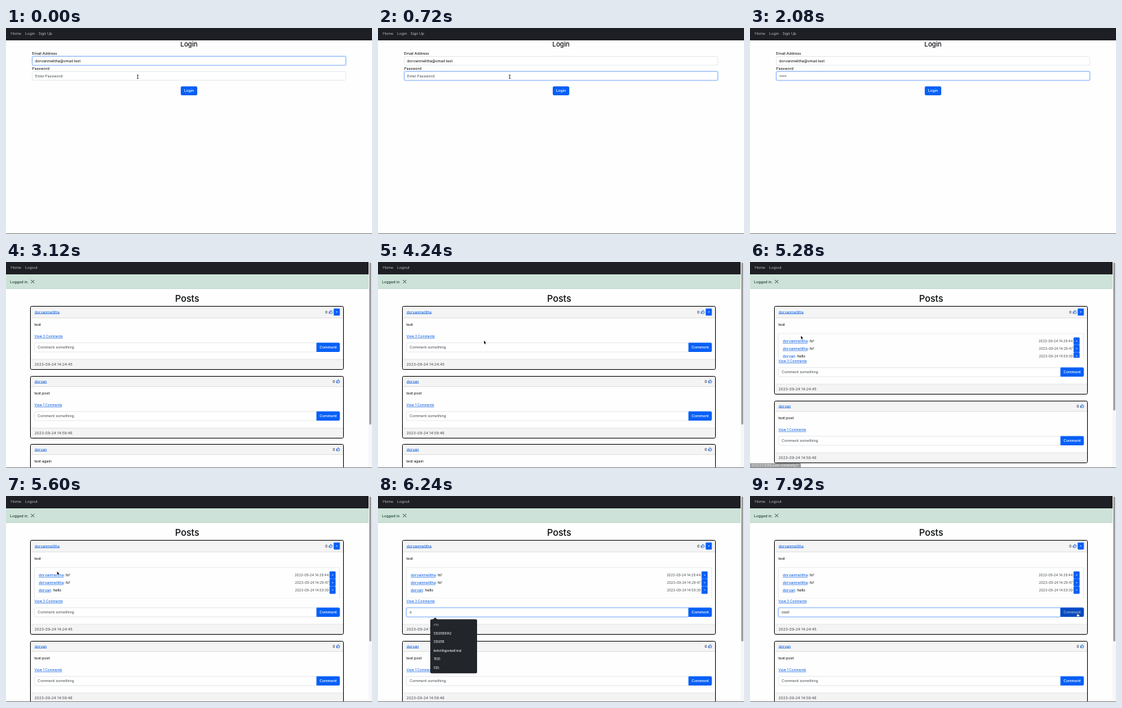
Animation of 532 by 300 pixels, one loop 8000 ms. Source, as an HTML page with a canvas:

```html
<!DOCTYPE html>
<html lang="en">
<head>
<meta charset="utf-8">
<title>Login and comment</title>
<style>
html, body { margin: 0; width: 100%; height: 100%; overflow: hidden; background: #fefefe; }
canvas { display: block; width: 532px; height: 300px; }
</style>
</head>
<body>
<canvas id="stage" width="532" height="300"></canvas>
<script>
const ctx = document.getElementById('stage').getContext('2d');
const LOOP = 8000;
const PAGE = '#fefefe', DARK = '#1e1f24', INK = '#05070a', MUTED = '#434a50', BLUE = '#0760f6', LINK = '#0058e0';
const USER = 'dorvanmelitha', FRIEND = 'dorvan';
const BASE = 5.4, SMALL = 4.8;

const clamp = v => Math.max(0, Math.min(1, v));
const ramp = (t, start, length) => clamp((t - start) / length);
const countPast = (times, t) => times.filter(at => t >= at).length;

// CSS "ease": cubic-bezier(.25, .1, .25, 1)
function ease(x) {
  let lo = 0, hi = 1;
  for (let i = 0; i < 20; i++) {
    const u = (lo + hi) / 2;
    if (0.75 * u * (1 - u) + u ** 3 < x) lo = u; else hi = u;
  }
  return 0.3 * lo * (1 - lo) ** 2 + 3 * lo * lo * (1 - lo) + lo ** 3;
}

function rect(x, y, w, h, color) {
  ctx.fillStyle = color;
  ctx.fillRect(x, y, w, h);
}

function rounded(x, y, w, h, r, fill, stroke, line = 1) {
  ctx.beginPath();
  ctx.roundRect(x, y, w, h, r);
  if (fill) { ctx.fillStyle = fill; ctx.fill(); }
  if (stroke) { ctx.strokeStyle = stroke; ctx.lineWidth = line; ctx.stroke(); }
}

// y is the middle of the capitals
function text(str, x, y, { size = BASE, color = INK, align = 'left', weight = 400, underline } = {}) {
  ctx.font = `${weight} ${size}px Inter, "Liberation Sans", sans-serif`;
  ctx.textAlign = align;
  ctx.fillStyle = color;
  const base = y + size * 0.36;
  ctx.fillText(str, x, base);
  const width = ctx.measureText(str).width;
  if (underline) rect(x, base + 0.6, width, 0.6, color);
  return width;
}

const link = (str, x, y, size = BASE) => text(str, x, y, { size, color: LINK, underline: true });

function field(x, y, w, h, focus) {
  rounded(x, y, w, h, 2, '#fff', '#dcdfe3', 0.7);
  if (focus > 0) {
    ctx.globalAlpha = focus;
    rounded(x - 0.5, y - 0.5, w + 1, h + 1, 2.2, null, '#c8ddfe', 1.2);
    rounded(x, y, w, h, 2, null, '#86b7fe', 0.7);
    ctx.globalAlpha = 1;
  }
}

function button(label, x, y, w, h, r) {
  rounded(x, y, w, h, r, BLUE);
  text(label, x + w / 2, y + h / 2, { color: '#fff', align: 'center', weight: 500 });
}

function navbar(width, items) {
  rect(0, 0, width, 18, DARK);
  items.forEach(([label, x]) => text(label, x, 8.2, { color: '#b9bbbe' }));
}

function ibeam(x, y) {
  rect(x - 0.4, y - 2.6, 0.8, 5.2, '#222');
  rect(x - 1.4, y - 3, 2.8, 0.6, '#222');
  rect(x - 1.4, y + 2.4, 2.8, 0.6, '#222');
}

function shape(points, x, y) {
  ctx.beginPath();
  points.forEach(([px, py]) => ctx.lineTo(x + px, y + py));
  ctx.closePath();
  ctx.lineJoin = 'round';
  ctx.strokeStyle = '#fff';
  ctx.lineWidth = 1;
  ctx.stroke();
  ctx.fillStyle = '#111';
  ctx.fill();
}

const arrow = (x, y) => shape([[0, 0], [0, 4.6], [1.1, 3.7], [1.9, 5.4], [2.6, 5.1], [1.9, 3.5], [3.3, 3.4]], x, y);

function hand(x, y) {
  rounded(x - 0.8, y - 0.2, 1.4, 4, 0.7, '#fff', '#111', 0.5);
  rounded(x - 1.7, y + 2, 4.2, 3.2, 1, '#fff', '#111', 0.5);
}

function thumbsUp(x, y) {
  ctx.strokeStyle = LINK;
  ctx.lineWidth = 0.7;
  ctx.beginPath();
  ctx.rect(x - 2.4, y - 0.4, 1.2, 2.6);
  ctx.moveTo(x - 1.2, y - 0.3);
  ctx.lineTo(x, y - 2.5);
  ctx.lineTo(x + 0.7, y - 2);
  ctx.lineTo(x + 0.4, y - 0.6);
  ctx.lineTo(x + 2.4, y - 0.6);
  ctx.lineTo(x + 1.8, y + 2.2);
  ctx.lineTo(x - 1.2, y + 2.2);
  ctx.stroke();
}

function dropButton(x, y, w, h) {
  rounded(x, y, w, h, 1.3, BLUE);
  const cx = x + w / 2, cy = y + h / 2;
  ctx.fillStyle = '#fff';
  ctx.beginPath();
  ctx.moveTo(cx - 1.2, cy - 0.5);
  ctx.lineTo(cx + 1.2, cy - 0.5);
  ctx.lineTo(cx, cy + 0.8);
  ctx.fill();
}

function loginPage(t) {
  const focus = ease(ramp(t, 80, 200));
  navbar(532, [['Home', 7], ['Login', 28], ['Sign Up', 47.3]]);
  text('Login', 266, 24, { size: 9.4, align: 'center', weight: 500 });
  text('Email Address', 38, 37);
  field(38.3, 41.4, 455.6, 12.8, 1 - focus);
  text(USER + '@vmail.test', 42.3, 47.8);
  text('Password', 38, 58.8);
  field(38.3, 63.4, 455.6, 12.8, focus);

  const firstTry = t >= 880 && t < 1280;
  const dots = firstTry ? 1 : countPast([1600, 1760, 1920, 2080, 2320, 2560, 2720], t);
  if (!dots) text('Enter Password', 42.3, 69.8, { color: MUTED });
  for (let i = 0; i < dots; i++) {
    ctx.fillStyle = INK;
    ctx.beginPath();
    ctx.arc(44 + i * 2.6, 69.9, 0.75, 0, 7);
    ctx.fill();
  }
  if (t >= 240 && t < 720) rect(42, 66.5, 0.6, 6.5, INK);

  button('Login', 254, 85, 24, 13, 2);
  if (t < 880) ibeam(191.5, 71);
}

function commentList(top, height) {
  if (height <= 0) return;
  ctx.save();
  ctx.beginPath();
  ctx.rect(40, top, 447, height);
  ctx.clip();
  rounded(41.3, top + 0.5, 443.7, 44.5, 1, null, '#d9dce0', 0.7);
  const rows = [[USER, 'hi!', '14:29:44'], [USER, 'hi!', '14:29:47'], [FRIEND, 'hello', '14:59:39']];
  rows.forEach(([name, message, time], i) => {
    const y = top + 11.8 + i * 10.9;
    const width = link(name, 47.5, y);
    text(': ' + message, 47.5 + width, y);
    text('2023-09-24 ' + time, 469, y - 0.2, { size: SMALL, color: MUTED, align: 'right' });
    dropButton(470.3, y - 5.5, 8.8, 10.9);
  });
  ctx.restore();
}

function card({ top, head, name, body, comments, stamp, grow = 0, own, focus = 0, draft = '', caret, hover = 0 }) {
  const inner = top + head, bottom = inner + grow + 75.5;
  rounded(35.5, top, 455, bottom - top, 2, PAGE);
  rect(36, top, 454, head, '#f4f4f4');
  rect(36, inner, 454, 0.6, '#cfcfcf');
  rect(36, bottom - 14.7, 454, 14.7, '#f4f4f4');
  rect(36, bottom - 14.9, 454, 0.6, '#d8d8d8');
  rounded(35.5, top, 455, bottom - top, 2, null, '#111', 1);

  const headY = top + head / 2;
  link(name, 41.5, headY);
  text('0', own ? 464 : 474.8, headY);
  thumbsUp(own ? 472 : 482.7, headY);
  if (own) dropButton(476.3, headY - 5, 9, 10.2);

  text(body, 41.3, inner + 10.3);
  commentList(inner + 22.5, grow);
  const y = inner + grow;
  link(`View ${comments} Comments`, 41.3, y + 27.4, SMALL);
  field(41.3, y + 36.8, 410, 13.2, focus);
  const width = draft ? text(draft, 46, y + 43.4) : 0;
  if (!draft && !caret) text('Comment something', 46, y + 43.4, { color: MUTED });
  if (caret) rect(46.3 + width, y + 40, 0.6, 6.6, INK);
  button('Comment', 451.3, y + 36.5, 34, 13.6, [0, 2, 2, 0]);
  if (hover > 0) {
    ctx.globalAlpha = hover * 0.3;
    rounded(451.3, y + 36.5, 34, 13.6, [0, 2, 2, 0], '#001a50');
    ctx.globalAlpha = 1;
  }
  text('2023-09-24 ' + stamp, 41.5, bottom - 7, { color: MUTED });
}

function suggestions() {
  ctx.fillStyle = '#22252a';
  ctx.beginPath();
  ctx.moveTo(79.5, 180);
  ctx.lineTo(83, 177);
  ctx.lineTo(86.5, 180);
  ctx.fill();
  rounded(76, 179.5, 68, 78.8, 2, '#22252a');
  ['cru', '5550100142', '555010', 'kelvrith@vmail.test', '1555', '555'].forEach((item, i) =>
    text(item, 81, 187.3 + i * 12.65, { size: 4.4, color: i ? '#f0f0f0' : '#b5b7ba', weight: 500 }));
}

function alertBar() {
  rect(0, 18, 527, 21, '#cde2d8');
  rect(0, 38.4, 527, 0.8, '#b4d3c5');
  text('Logged in.', 6, 29, { color: '#06281a' });
  ctx.strokeStyle = '#36433d';
  ctx.lineWidth = 0.9;
  ctx.beginPath();
  ctx.moveTo(36.2, 26); ctx.lineTo(41.2, 31);
  ctx.moveTo(41.2, 26); ctx.lineTo(36.2, 31);
  ctx.stroke();
}

// [time, x, y] of the pointer tip
const PATH = [
  [3200, 191, 71], [3680, 184, 102], [4240, 154, 114.5], [4640, 74, 107.5], [5560, 74, 107.5],
  [5900, 82, 169], [7000, 82, 169], [7400, 260, 182], [7840, 476.5, 170.5], [8000, 476.5, 170.5]
];

function pointerAt(t) {
  const i = Math.max(1, PATH.findIndex(([at]) => t <= at));
  const [t0, x0, y0] = PATH[i - 1], [t1, x1, y1] = PATH[i];
  const k = ramp(t, t0, t1 - t0), s = k * k * (3 - 2 * k);
  return [x0 + (x1 - x0) * s, y0 + (y1 - y0) * s];
}

function pointer(t) {
  if (t < 3200 || (t >= 6080 && t < 7040)) return;
  const [x, y] = pointerAt(t);
  const overField = x > 42 && x < 451 && t > 5600 && y > 163 && y < 176;
  if ((t >= 4640 && t < 5105) || t >= 7840) hand(x, y);
  else if (overField) ibeam(x, y);
  else arrow(x, y);
}

function postsPage(t) {
  const grow = Math.round(45 * ease(ramp(t, 5110, 350)));
  navbar(527, [['Home', 7], ['Logout', 28]]);
  alertBar();
  text('Posts', 263.3, 53.6, { size: 13.3, align: 'center', weight: 500 });

  card({
    top: 64.5, head: 16.5, name: USER, body: 'test', comments: 3, stamp: '14:24:45', own: true, grow,
    focus: ease(ramp(t, 5920, 150)),
    draft: 'cool'.slice(0, countPast([6200, 6340, 6480, 6720], t)),
    caret: t >= 5920 && t < 6200,
    hover: ramp(t, 7840, 80)
  });
  card({ top: 166.5 + grow, head: 14.5, name: FRIEND, body: 'test post', comments: 1, stamp: '14:59:46' });
  card({ top: 265.5 + grow, head: 14.5, name: FRIEND, body: 'test again', comments: 0, stamp: '15:02:10' });

  rect(527, 0, 5, 300, '#f7f7f7');
  rounded(528, 0.5, 3, 300 * 300 / (381 + grow), 1.5, '#a0a0a0');
  if (t >= 6000 && t < 6320) suggestions();
  if (t >= 4760 && t < 5600) {
    rounded(0, 293, 74, 7, [0, 2, 0, 0], '#9c9ea1');
    text('127.0.0.1:5000/view-comments/1', 2.5, 296.6, { size: 4.4, color: '#f4f4f4' });
  }
  pointer(t);
}

function draw(now) {
  const t = now % LOOP;
  rect(0, 0, 532, 300, PAGE);
  if (t < 3040) loginPage(t); else postsPage(t);
  rect(0, 299, 532, 1, '#8c8c8c');
  requestAnimationFrame(draw);
}
requestAnimationFrame(draw);
</script>
</body>
</html>
```
